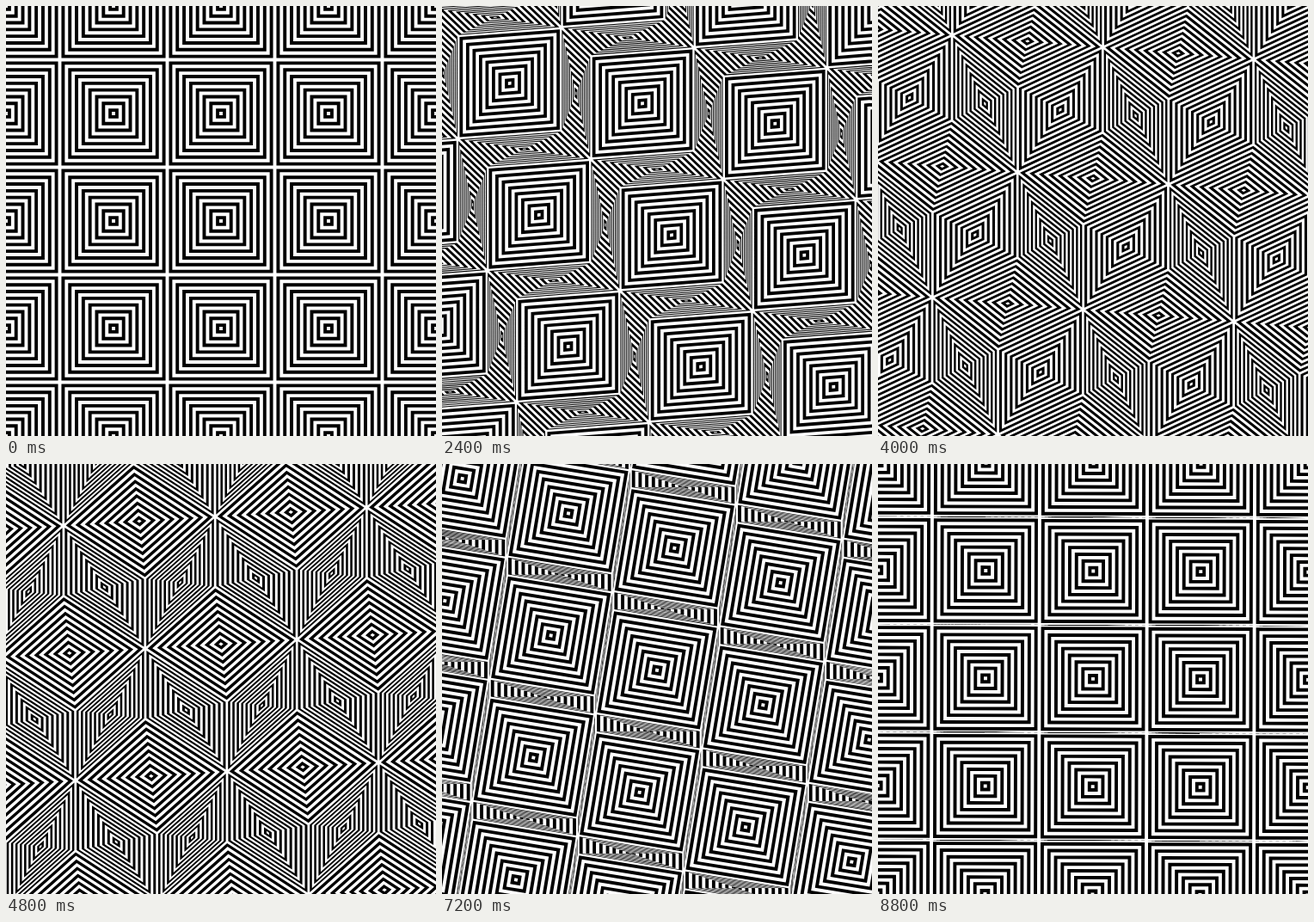
An HTML page with a canvas that plays this animation: 500 by 500 pixels, repeating every 9 s.

```html
<!DOCTYPE html>
<html>
<head>
<meta charset="utf-8">
<style>
  html, body { margin: 0; height: 100%; overflow: hidden; background: #fff; }
  canvas { display: block; }
</style>
</head>
<body>
<canvas id="stage" width="500" height="500"></canvas>
<script>
const ctx = document.getElementById('stage').getContext('2d');
const SIZE = 500, EDGE = 125, RINGS = 8, LOOP = 9000, STEP = 200, REACH = 8;

// Concentric square rings on a unit face
const face = new Path2D();
for (let i = 0; i < 2 * RINGS; i++) {
  const r = (i + 0.5) / (4 * RINGS);
  face.rect(-r, -r, 2 * r, 2 * r);
}

function drawFace(x, y, u, v) {
  ctx.setTransform(u[0], u[1], v[0], v[1], x, y);
  ctx.fill(face, 'evenodd');
}

// A staircase of cubes turns a quarter about y and about x at once
function draw(time) {
  const p = time / LOOP;
  const angle = p * p * (3 - 2 * p) * Math.PI / 2;
  const c = Math.cos(angle), s = Math.sin(angle);
  const X = [EDGE * c, -EDGE * s * s];
  const Y = [0, EDGE * c];
  const Z = [EDGE * s, EDGE * s * c];

  ctx.setTransform(1, 0, 0, 1, 0, 0);
  ctx.fillStyle = '#fff';
  ctx.fillRect(0, 0, SIZE, SIZE);
  ctx.fillStyle = '#000';

  for (let m = -REACH; m <= REACH; m++) {
    for (let n = -REACH; n <= REACH; n++) {
      const x = SIZE / 2 + m * (X[0] + Z[0]) + n * (Y[0] + Z[0]);
      const y = SIZE / 2 + m * (X[1] + Z[1]) + n * (Y[1] + Z[1]);
      if (Math.max(Math.abs(x - SIZE / 2), Math.abs(y - SIZE / 2)) > SIZE) continue;
      drawFace(x + Z[0] / 2, y + Z[1] / 2, X, Y);
      drawFace(x - X[0] / 2, y - X[1] / 2, Y, Z);
      drawFace(x - Y[0] / 2, y - Y[1] / 2, X, Z);
    }
  }
}

function tick() {
  const time = performance.now() % LOOP;
  draw(Math.floor(time / STEP) * STEP);
  requestAnimationFrame(tick);
}
tick();
</script>
</body>
</html>
```
